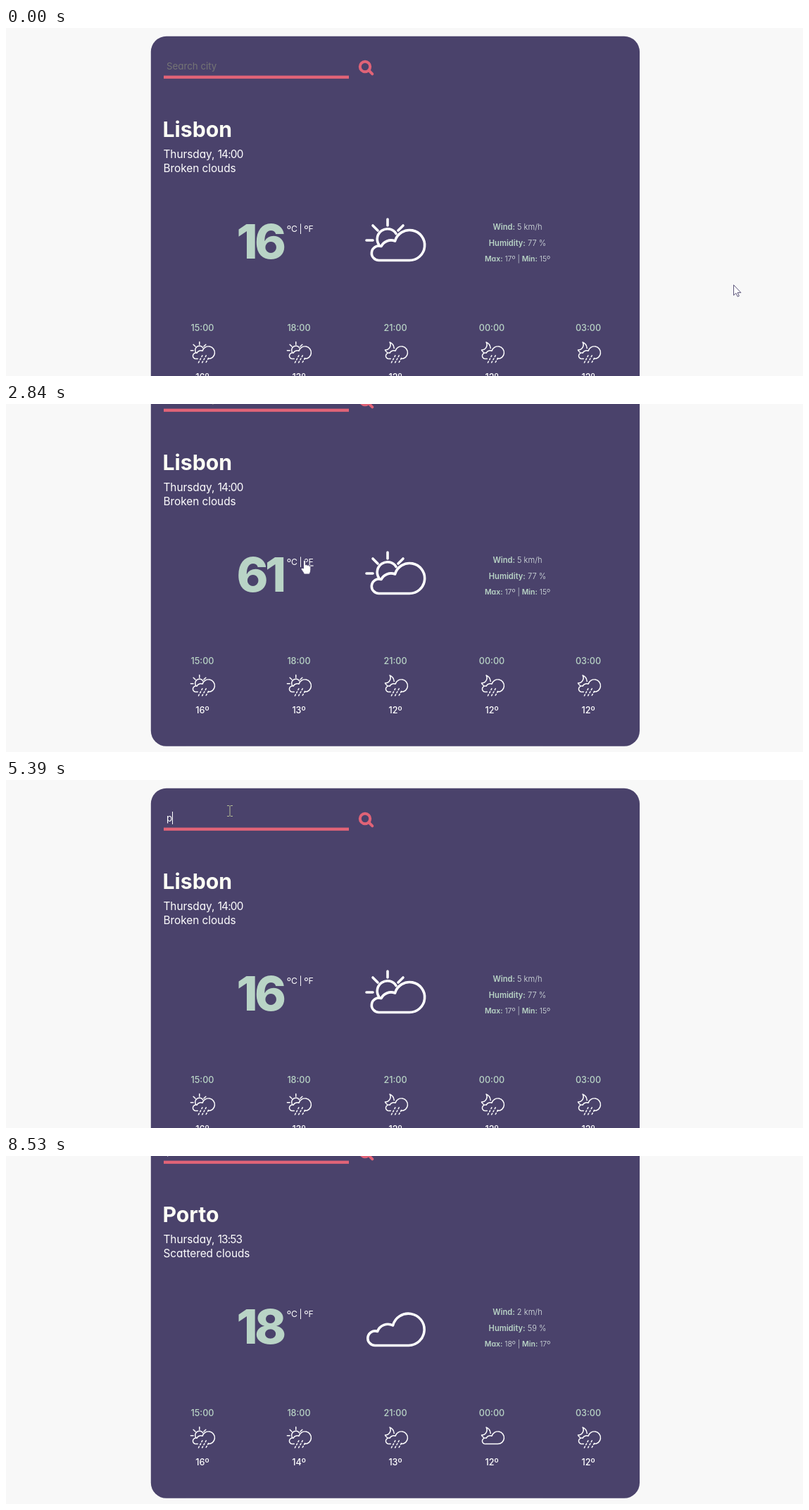
Animation, 1132 px wide and 495 px high, one loop 8.89 s. Source, as an HTML page:

```html
<!DOCTYPE html>
<html lang="en">
<head>
<meta charset="utf-8">
<title>Weather</title>
<style>
  html, body { margin: 0; height: 100%; overflow: hidden; background: #f8f8f8; }
  svg { display: block; width: 100%; height: 100%; }
  text { font-family: Inter, "Open Sans", sans-serif; font-feature-settings: "cv11"; fill: #fff; white-space: pre; }
  .input { font-size: 13.3px; }
  .hint { fill: #757575; }
  .city { font-size: 30.2px; font-weight: 700; fill: #fefff5; }
  .day, .sky { font-size: 15.3px; }
  .time { letter-spacing: -.8px; }
  .degrees { font-size: 68px; font-weight: 800; letter-spacing: -4.5px; fill: #b9d4c6; }
  .unit { font-size: 12.2px; }
  .detail { font-size: 11.1px; font-weight: 300; text-anchor: middle; fill: #dce7e5; }
  .detail tspan { font-weight: 600; fill: #b9d4c6; }
  .range { font-size: 10.5px; }
  .hour, .temp { font-size: 12.6px; font-weight: 500; text-anchor: middle; }
  .hour { fill: #b9d4c6; }
  .icon { fill: none; stroke: #fff; stroke-width: 3.6; stroke-linecap: round; stroke-linejoin: round; }
  .rain { stroke-dasharray: 5 6.5; }
  .magnifier { fill: none; stroke: #e06377; stroke-width: 4; stroke-linecap: round; }
  .pointer { fill: #fff; stroke: #4a426b; stroke-width: .9; stroke-linejoin: round; }
</style>
</head>
<body>
<svg viewBox="0 0 1132 495">
  <g id="page">
    <rect x="205.8" y="11.8" width="694.2" height="536" rx="22" fill="#4a426b"/>
    <text class="input hint" id="hint" x="228" y="59">Search city</text>
    <text class="input" id="typed" x="228" y="59"></text>
    <rect id="caret" y="45" width="1" height="18" fill="#fff"/>
    <rect x="224" y="67.7" width="263" height="4.4" fill="#e06377"/>
    <path class="magnifier" d="M515.5 60.5l4.8 4.8"/>
    <circle class="magnifier" cx="510" cy="55" r="7.2"/>
    <text class="unit" id="celsius" x="399" y="289.5">ºC</text>
    <text class="unit" x="418.5" y="289.5" text-anchor="middle">|</text>
    <text class="unit" id="fahrenheit" x="423.5" y="289.5">ºF</text>
    <g id="weather"></g>
  </g>
  <g id="cursor">
    <path id="arrow" class="pointer" d="M.5.5V15.2l3.3-3.1 2.4 5 2.1-1-2.3-4.7h4.8z"/>
    <path id="hand" class="pointer" d="M-1.5 12V1.2Q0-1 1.5 1.2V7Q3 5.8 4 7.4 5.6 6.4 6.6 8.2 8.4 7.6 8.8 9.5V14Q8.6 17 7 20H-.5Q-2 16.5-5 13 -4.6 10.4-1.5 12z"/>
    <path id="beam" fill="none" stroke="#b5bd94" d="M-4-7.5H-1L0-6.5 1-7.5H4M0-6.5V6.5M-4 7.5H-1L0 6.5 1 7.5H4"/>
  </g>
</svg>
<script>
const LOOP = 8890, SCROLL = 61, HOURS = ['15:00', '18:00', '21:00', '00:00', '03:00'];
const $ = id => document.getElementById(id);
const show = (el, on) => el.setAttribute('visibility', on ? 'visible' : 'hidden');
const within = (t, ...spans) => spans.some(([a, b]) => t >= a && t < b);

const BASE = 'H530.5A10.3 10.3 0 1 1 533 310.5A15.5 15.5 0 0 1 552.5 303A21.5 21.5 0 1 1 573 330.5';
const cloud = `<path d="M573 330.5${BASE}"/>`;
const rain = `<path d="M536 330.5${BASE}"/><path class="rain" d="M552 319l-14 26M565 319l-16 29M573 328l-10 18"/>`;
const sun = '<path d="M529.5 308A14 14 0 1 1 554 292.5M542 272V281M512 302H521M521 281l7 7M564 281l-7 7"/>';
const moon = '<path d="M524 308Q519 305 517 300A18 18 0 0 0 533 273Q546 278 548 294"/>';
const wideCloud = '<path d="M572 330.5H525A10.3 10.3 0 1 1 527.5 310.5A16 16 0 0 1 549.5 302A22.7 22.7 0 1 1 572 330.5z"/>';

const cities = [
  { name: 'Lisbon', time: '14:00', sky: 'Broken clouds', degrees: 16, icon: sun + cloud,
    wind: 5, humidity: 77, max: 17, min: 15, temps: [16, 13, 12, 12, 12],
    icons: [sun + rain, sun + rain, moon + rain, moon + rain, moon + rain] },
  { name: 'Porto', time: '13:53', sky: 'Scattered clouds', degrees: 18, icon: wideCloud,
    wind: 2, humidity: 59, max: 18, min: 17, temps: [16, 14, 13, 12, 12],
    icons: [sun + rain, sun + rain, moon + rain, moon + cloud, moon + rain] }
];

const column = (city, i) => {
  const x = 279 + 137 * i;
  return `<g class="column">
    <text class="hour" x="${x}" y="430.8">${HOURS[i]}</text>
    <g class="icon" transform="translate(${x} 446.5) scale(.412) translate(-552.3 -272)">${city.icons[i]}</g>
    <text class="temp" x="${x}" y="500.8">${city.temps[i]}º</text></g>`;
};

$('weather').innerHTML = cities.map(c => `<g class="now">
    <text class="city" x="222.5" y="155">${c.name}</text>
    <text class="day" x="223.5" y="184.7">Thursday, <tspan class="time">${c.time}</tspan></text>
    <text class="sky" x="223.5" y="205">${c.sky}</text>
    <text class="degrees" x="327.5" y="327.5">${c.degrees}</text>
    <g class="icon">${c.icon}</g>
    <text class="detail" x="726.5" y="286.7"><tspan>Wind:</tspan> ${c.wind} km/h</text>
    <text class="detail" x="726.5" y="309.5"><tspan>Humidity:</tspan> ${c.humidity} %</text>
    <text class="detail range" x="726.5" y="332"><tspan>Max:</tspan> ${c.max}º | <tspan>Min:</tspan> ${c.min}º</text>
  </g>` + HOURS.map((_, i) => column(c, i)).join('')).join('');

const now = document.querySelectorAll('.now');
const columns = document.querySelectorAll('.column');
const degrees = document.querySelector('.degrees');

const bursts = [[430, 620, 4], [1250, 1700, 8], [1900, 2210, 6], [2840, 3390, 10],
  [3770, 4640, 15], [7200, 7710, 9], [7960, 8530, 9]];
const lastStep = t => bursts.reduce((last, [a, b, n]) => {
  if (t < a) return last;
  const step = (b - a) / (n - 1);
  return a + Math.floor((Math.min(t, b) - a) / step + 1e-6) * step;
}, 0);

const ease = (t, a, b) => {
  const p = Math.max(0, Math.min(1, (t - a) / (b - a)));
  return p * p * (3 - 2 * p);
};

// time, x, y
const path = [[0, 1033, 365], [1190, 1033, 365], [1400, 700, 250], [1510, 480, 184], [1570, 437, 180],
  [1700, 436, 226], [1860, 436, 226], [2020, 424, 222], [2840, 424, 222], [3020, 407, 222],
  [3200, 407, 222], [3390, 419, 226], [4142, 419, 226], [4640, 318, 44], [7140, 318, 44],
  [7200, 358, 77], [7455, 560, 200], [7900, 560, 200], [8250, 1000, 350], [8460, 1071, 462], [LOOP, 1071, 462]];
const pointerAt = t => {
  const i = path.findIndex(p => p[0] > t);
  const [a, b] = [path[i - 1], path[i]];
  const k = (t - a[0]) / (b[0] - a[0]);
  return [1, 2].map(j => Math.round(a[j] + (b[j] - a[j]) * k));
};

const keyTimes = [5390, 5490, 5590, 5840, 5890];

function render(t) {
  const s = lastStep(t);
  const scroll = Math.round(SCROLL * (ease(s, 380, 620) - ease(s, 3730, 4110) + ease(s, 7460, 7710)));
  $('page').setAttribute('transform', `translate(0 ${-scroll})`);

  const typed = 'porto'.slice(0, keyTimes.filter(k => t >= k).length);
  if ($('typed').textContent !== typed) $('typed').textContent = typed;
  show($('hint'), !typed);
  $('caret').setAttribute('x', Math.round(228 + (typed ? $('typed').getComputedTextLength() : 0)));
  show($('caret'), within(t, [4590, 5090], [5390, 6390], [7020, 7520], [8020, 8520]));

  now.forEach((el, c) => show(el, (t >= 6390) === (c === 1)));
  columns.forEach((el, i) => show(el, (t >= (i % 5 === 3 ? 6840 : 6460)) === (i >= 5)));
  degrees.textContent = within(t, [2210, 3110]) ? 61 : 16;

  const onF = within(s, [1960, 2900]), onC = within(s, [2960, 3300]);
  $('fahrenheit').style.textDecoration = onF ? 'underline' : 'none';
  $('celsius').style.textDecoration = onC ? 'underline' : 'none';

  const shape = onF || onC ? 'hand' : within(s, [4570, 7200]) ? 'beam' : 'arrow';
  for (const id of ['arrow', 'hand', 'beam']) show($(id), id === shape && t < 8530);
  $('cursor').setAttribute('transform', `translate(${pointerAt(s)})`);
}

const start = performance.now();
function tick() {
  render((performance.now() - start) % LOOP);
  requestAnimationFrame(tick);
}
tick();
</script>
</body>
</html>
```
